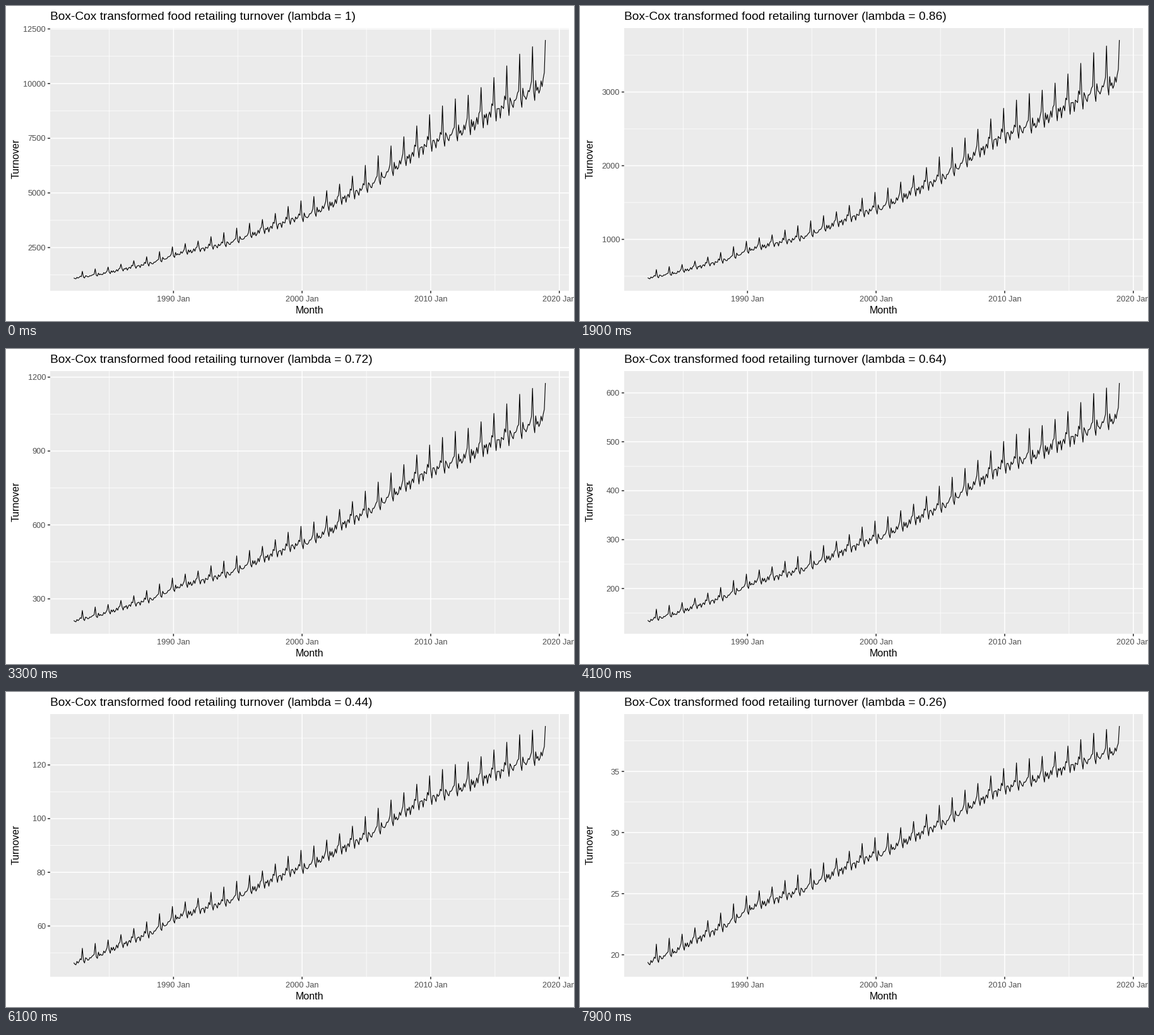
Recreate the animation shown at these times as a matplotlib script. Size 900 by 500 pixels, loop 8000 ms.

```python
import math

import numpy as np
import matplotlib.pyplot as plt
from matplotlib.animation import FuncAnimation
from matplotlib.collections import LineCollection
from matplotlib.patches import Rectangle

W, H, DPI = 900, 500, 100
LEFT, RIGHT, TOP, BOTTOM = 70, 892, 35, 452
FRAMES, HOLD = 80, 5
LAMBDA_STEP = 0.010088
GREY = "#4D4D4D"

# Key points of the yearly level, and the share of each month in it
TREND = {1981: 1020, 1984: 1300, 1988: 1818, 1990: 2241, 1994: 2733,
         1999: 3850, 2000: 3970, 2005: 5420, 2009: 7150, 2012: 7900,
         2019: 10230}
SEASON = [1.0, .943, 1.02, .994, .995, .958, .993, 1.005, .99, 1.033, 1.035,
          1.17]

plt.rcParams["font.family"] = "Liberation Sans"


def days(months):
    return np.asarray(months, "datetime64[M]").astype("datetime64[D]").astype(int)


def turnover(serial, first_day, length):
    """One month's sales: trend, season and the weekdays beyond four weeks."""
    year, month = 1970 + serial // 12, serial % 12
    late = (year - 1982) / 36
    level = np.interp(year + (month - 5) / 12, list(TREND), list(TREND.values()))
    share = SEASON[month]
    if month == 11:
        share += 0.03 * (2 * late - 1) ** 2
    weekday = (first_day + 3) % 7 + np.arange(length - 28)
    busy = np.cos(2 * np.pi * (weekday - 3.6) / 7).sum()
    share += 0.0065 * (1.7 - 0.7 * late) * busy
    return max(level * share, 1072)


def scaler(lo, hi, a, b):
    """Map lo..hi into a..b with a 5 % margin at both ends."""
    pad = 0.05 * (hi - lo)
    lo, hi = lo - pad, hi + pad
    return lo, hi, lambda v: a + (np.asarray(v) - lo) / (hi - lo) * (b - a)


def breaks(dmin, dmax, m=5):
    """Extended Wilkinson tick search; returns first tick, step and count."""
    span = dmax - dmin
    best, found = -2, None
    j = 1
    while True:
        for i, q in enumerate((1, 5, 2, 2.5, 4, 3)):
            simple = 1 - i / 5 - j
            top = 0.25 * (simple + 1)
            if top + 0.75 < best:
                return found
            k = 2
            while True:
                dens = 2 - (k - 1) / (m - 1) if k >= m else 1
                if top + 0.25 + 0.5 * dens < best:
                    break
                z = math.ceil(math.log10(span / (k + 1) / j / q))
                while True:
                    step = j * q * 10.0 ** z
                    width = step * (k - 1)
                    half = max(width - span, 0) / 2
                    cover = 1 - half ** 2 / (0.1 * span) ** 2
                    if top + 0.2 * cover + 0.5 * dens + 0.05 < best:
                        break
                    s0 = math.floor(dmax / step) * j - (k - 1) * j
                    s1 = math.ceil(dmin / step) * j
                    for s in range(s0, s1 + 1):
                        lo = s * step / j
                        hi = lo + width
                        zero = s % j == 0 and lo <= 0 <= hi
                        off = (dmax - hi) ** 2 + (dmin - lo) ** 2
                        c = 1 - 0.5 * off / (0.1 * span) ** 2
                        r = (k - 1) / width
                        rt = (m - 1) / (max(hi, dmax) - min(lo, dmin))
                        g = 2 - max(r / rt, rt / r)
                        score = (0.25 * (simple + zero) + 0.2 * c
                                 + 0.5 * g + 0.05)
                        if score > best:
                            best, found = score, (lo, step, k)
                    z += 1
                k += 1
        j += 1


months = np.arange("1982-04", "2019-01", dtype="datetime64[M]")
start = days(months)
sales = np.array([turnover(*row) for row in
                  zip(months.astype(int), start, days(months + 1) - start)])

fig = plt.figure(figsize=(W / DPI, H / DPI), dpi=DPI, facecolor="white")
ax = fig.add_axes([0, 0, 1, 1])
ax.set_xlim(0, W)
ax.set_ylim(H, 0)
ax.axis("off")


def text(x, y, s, px, color="black", **kw):
    return ax.text(x, y, s, fontsize=px * 72 / DPI, color=color,
                   va="baseline", **kw)


def lines(color, px, order, segs=()):
    group = LineCollection(list(segs), colors=color, linewidths=px * 72 / DPI,
                           zorder=order, capstyle="butt")
    group.set_snap(False)
    ax.add_collection(group, autolim=False)
    return group


def across(ys, x0=LEFT, x1=RIGHT):
    return [[(x0, y), (x1, y)] for y in ys]


def down(xs, y0=TOP, y1=BOTTOM):
    return [[(x, y0), (x, y1)] for x in xs]


ax.add_patch(Rectangle((LEFT, TOP), RIGHT - LEFT, BOTTOM - TOP,
                       facecolor="#EBEBEB", linewidth=0, zorder=0))

to_x = scaler(start[0], start[-1], LEFT, RIGHT)[2]
curve_x = to_x(start)
decades = range(1990, 2021, 10)
major_x = to_x(days([f"{y}-01" for y in decades]))
minor_x = to_x(days([f"{y - 5}-01" for y in decades]))
lines("white", 0.78, 1, down(minor_x))
lines("white", 1.55, 2, down(major_x))
lines("#333333", 1.55, 2, down(major_x, BOTTOM, BOTTOM + 4))
for x, year in zip(major_x, decades):
    text(x, 469, f"{year} Jan", 12.8, GREY, ha="center")

text(481, 488, "Month", 16, ha="center")
text(20.6, 242.5, "Turnover", 16, ha="center", rotation=90,
     rotation_mode="anchor")
title = text(LEFT, 22, "", 19.2, ha="left")

minor_y = lines("white", 0.78, 1)
major_y = lines("white", 1.55, 2)
ticks_y = lines("#333333", 1.55, 2)
labels = [text(63, 0, "", 12.8, GREY, ha="right") for _ in range(10)]
curve, = ax.plot([], [], color="black", lw=1.12 * 72 / DPI, zorder=3,
                 solid_joinstyle="round", solid_capstyle="butt")


def draw(frame):
    n = max(frame - HOLD, 0)
    lam = 1 - LAMBDA_STEP * n
    w = (sales ** lam - 1) / lam
    lo, hi, to_y = scaler(w.min(), w.max(), BOTTOM, TOP)

    first, step, count = breaks(lo, hi)
    grid = first + step * np.arange(-1, count + 1)
    half = grid[:-1] + step / 2
    grid = [v for v in grid if lo <= v <= hi]
    half = [v for v in half if lo <= v <= hi]
    ys = to_y(grid)

    minor_y.set_segments(across(to_y(half)))
    major_y.set_segments(across(ys))
    ticks_y.set_segments(across(ys, LEFT - 4, LEFT))
    for label in labels:
        label.set_text("")
    for label, v, y in zip(labels, grid, ys):
        label.set_text(f"{v:g}")
        label.set_y(y + 4.5)

    curve.set_data(curve_x, to_y(w))
    title.set_text("Box-Cox transformed food retailing turnover "
                   f"(lambda = {round(1 - n / 100, 2):g})")
    return [curve, title, minor_y, major_y, ticks_y, *labels]


anim = FuncAnimation(fig, draw, frames=FRAMES, interval=100, repeat=True,
                     repeat_delay=0, blit=False)
plt.show()
```
